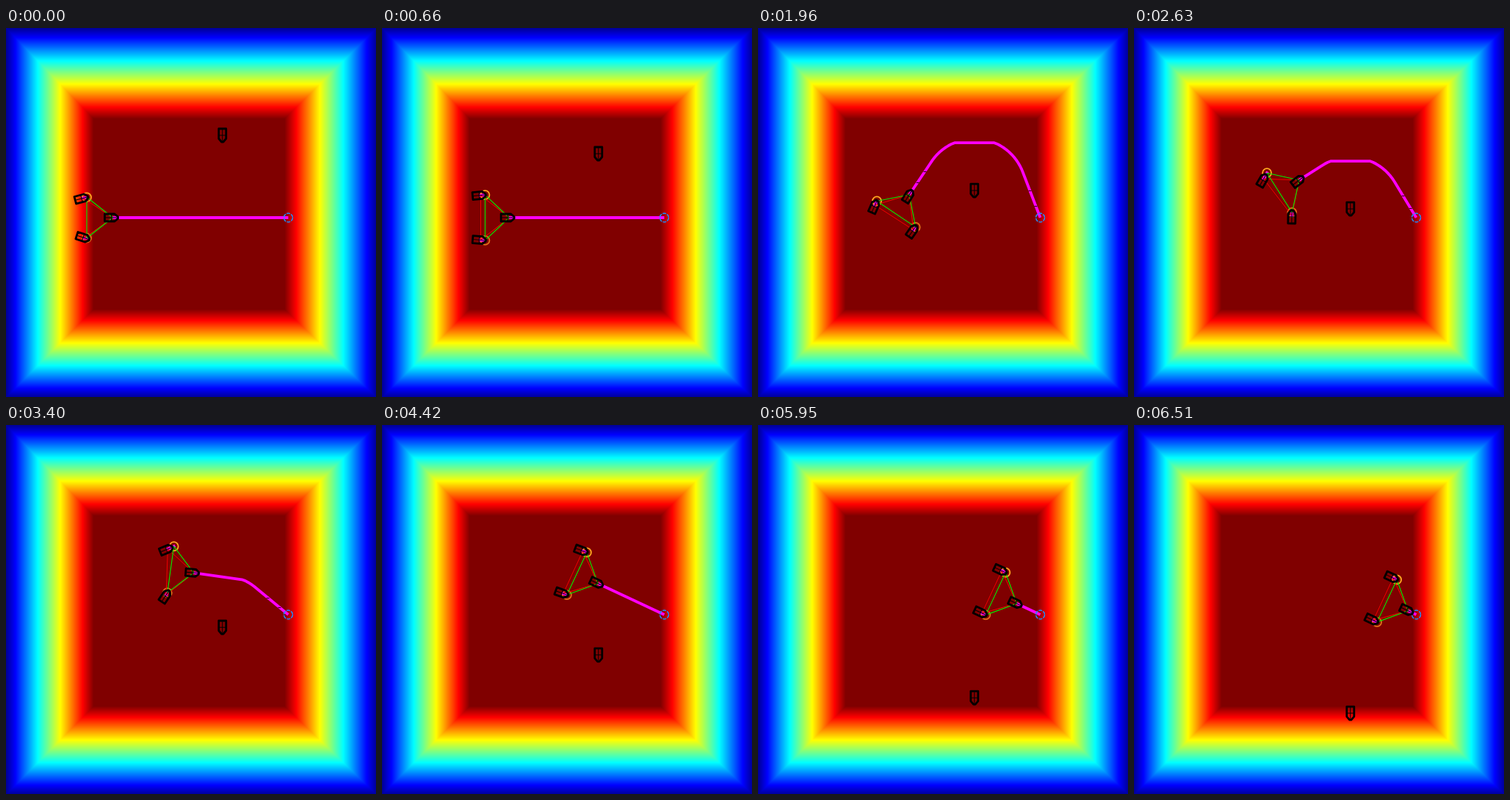
Recreate the animation shown at these times as an HTML page with a canvas. Size 504 by 502 pixels, loop 6.63 s.

```html
<!DOCTYPE html>
<html lang="en">
<head>
<meta charset="utf-8">
<title>Boat formation</title>
<style>
html, body { margin: 0; width: 100%; height: 100%; overflow: hidden; background: #7f0000; }
canvas { display: block; }
</style>
</head>
<body>
<canvas id="stage" width="504" height="502"></canvas>
<script>
const W = 504, H = 502, LOOP = 6630, STEPS = 60;
const SPEED = 4.6;         // leader, pixels per step
const CHASE = 9;           // fastest follower, pixels per step
const TURN = 45;           // largest turn per step, degrees
const CLEAR = 70.5;        // keep-out radius around the crossing boat
const FLAT = 65;           // height at which the keep-out circle is cut off
const ARM = 45;            // distance from leader to each follower slot
const goal = { x: 384.5, y: 258 };
const ctx = document.getElementById('stage').getContext('2d');

const clamp = (v, lo, hi) => Math.max(lo, Math.min(hi, v));
const rad = deg => deg * Math.PI / 180;
const bearing = (a, b) => Math.atan2(b.y - a.y, b.x - a.x) * 180 / Math.PI;
const turnTo = (from, to) => ((to - from + 540) % 360 + 360) % 360 - 180;
const ahead = (p, dist, deg) => ({
  x: p.x + dist * Math.cos(rad(deg)),
  y: p.y + dist * Math.sin(rad(deg))
});
const nose = b => ahead(b, 2, b.dir);

// Taut route to the goal, over the top of the keep-out circle
function route(start, cross) {
  const pts = [start];
  if (cross.y + CLEAR > goal.y) {
    for (let a = 180; a <= 360; a += 4) {
      const p = ahead(cross, CLEAR, a);
      p.y = Math.max(p.y, cross.y - FLAT);
      if (p.x > start.x && p.x < goal.x) pts.push(p);
    }
  }
  pts.push(goal);
  const hull = [];
  for (const p of pts) {
    while (hull.length > 1) {
      const [a, b] = hull.slice(-2);
      if ((b.x - a.x) * (p.y - a.y) - (b.y - a.y) * (p.x - a.x) > 0) break;
      hull.pop();
    }
    hull.push(p);
  }
  return hull;
}

// A boat slows down while it is still turning onto its route
function follow(boat, path) {
  const err = turnTo(boat.dir, bearing(path[0], path[1]));
  const dir = boat.dir + clamp(err, -TURN, TURN);
  return { ...ahead(boat, SPEED * Math.max(0, Math.cos(rad(err))), dir), dir };
}

function chase(boat, slot) {
  const ref = nose(boat), to = bearing(ref, slot);
  const gap = Math.hypot(slot.x - ref.x, slot.y - ref.y);
  const dir = boat.dir + clamp(turnTo(boat.dir, to), -TURN, TURN);
  return { ...ahead(boat, Math.min(CHASE, 0.45 * gap), to), dir };
}

function plan(leader, cross, step) {
  const path = route(nose(leader), cross);
  const back = bearing(path[0], path[1]) + 180;
  const half = 45 - 7 * Math.exp(-step / 4);
  return { path, slots: [half, -half].map(a => ahead(path[0], ARM, back + a)) };
}

function simulate() {
  let leader = { x: 143.5, y: 258, dir: 0 };
  let crew = [{ x: 103, y: 232, dir: -15 }, { x: 105, y: 285, dir: 18 }];
  let view;
  const states = [];
  for (let step = 0; step < STEPS; step++) {
    const cross = { x: 294.8, y: 146 + 4.17 * step, dir: 90 };
    if (step) leader = follow(leader, view.path);
    view = plan(leader, cross, step);
    if (step) crew = crew.map((b, i) => chase(b, view.slots[i]));
    states.push({ leader, crew, cross, ...view });
  }
  return states;
}

function paintField() {
  const img = ctx.createImageData(W, H);
  const ramp = (v, mid) => 255 * clamp(1.5 - Math.abs(4 * v - mid), 0, 1);
  for (let y = 0, i = 0; y < H; y++) {
    for (let x = 0; x < W; x++, i += 4) {
      const d = Math.min(1, x / 119, (W - x) / 125, y / 123, (H - y) / 120);
      const v = 0.024 + 0.976 * d;
      img.data.set([ramp(v, 3), ramp(v, 2), ramp(v, 1), 255], i);
    }
  }
  return img;
}

function line(pts, color, width, closed) {
  ctx.beginPath();
  pts.forEach(p => ctx.lineTo(p.x, p.y));
  if (closed) ctx.closePath();
  ctx.strokeStyle = color;
  ctx.lineWidth = width;
  ctx.stroke();
}

function ring(p, color, width) {
  ctx.beginPath();
  ctx.arc(p.x, p.y, 6, 0, 2 * Math.PI);
  ctx.strokeStyle = color;
  ctx.lineWidth = width;
  ctx.stroke();
}

// Thin marks across the steep legs of a detour
function drawTicks(path) {
  if (path.length < 3) return;
  path.slice(1).forEach((b, i) => {
    const a = path[i];
    if (Math.abs(b.y - a.y) < 20) return;
    for (const k of [0.4, 0.74]) {
      const x = a.x + (b.x - a.x) * k;
      const y = Math.round(a.y + (b.y - a.y) * k) + 0.5;
      line([{ x: x - 2, y }, { x: x + 2, y }], '#300010', 1);
    }
  });
}

function drawBoat(b) {
  ctx.save();
  ctx.translate(b.x, b.y);
  ctx.rotate(rad(b.dir));
  const poly = pts => pts.map(([x, y]) => ({ x, y }));
  line(poly([[-9, -5], [4.5, -5], [9, -1.2], [9, 1.2], [4.5, 5], [-9, 5]]), '#000', 2.8, true);
  line(poly([[-8, 0], [8, 0]]), '#000', 1);
  line(poly([[0, -5], [0, 5]]), '#000', 1);
  ctx.restore();
}

function draw({ leader, crew, cross, path, slots }) {
  ctx.putImageData(field, 0, 0);
  ctx.lineJoin = 'round';

  ring(slots[0], '#ffaa20', 1.8);
  ring(slots[1], '#e0701a', 1.8);

  line(path, '#f0f', 3.8);
  drawTicks(path);
  ctx.lineCap = 'square';
  crew.forEach((b, i) => line([nose(b), slots[i]], '#f0f', 3.8));
  ctx.lineCap = 'butt';

  ctx.setLineDash([5, 1.3]);
  ring(goal, '#1e90ff', 1.5);
  ctx.setLineDash([]);

  line([leader, ...crew].map(nose), '#f00000', 1, true);
  line([path[0], ...slots], '#00f000', 1.1, true);
  [leader, ...crew, cross].forEach(drawBoat);
}

const field = paintField();
const states = simulate();
const start = performance.now();
let shown = -1;

function frame() {
  const ms = (performance.now() - start) % LOOP;
  const step = Math.min(STEPS - 1, Math.floor(ms / LOOP * STEPS + 0.3));
  if (step !== shown) draw(states[shown = step]);
  requestAnimationFrame(frame);
}
frame();
</script>
</body>
</html>
```
